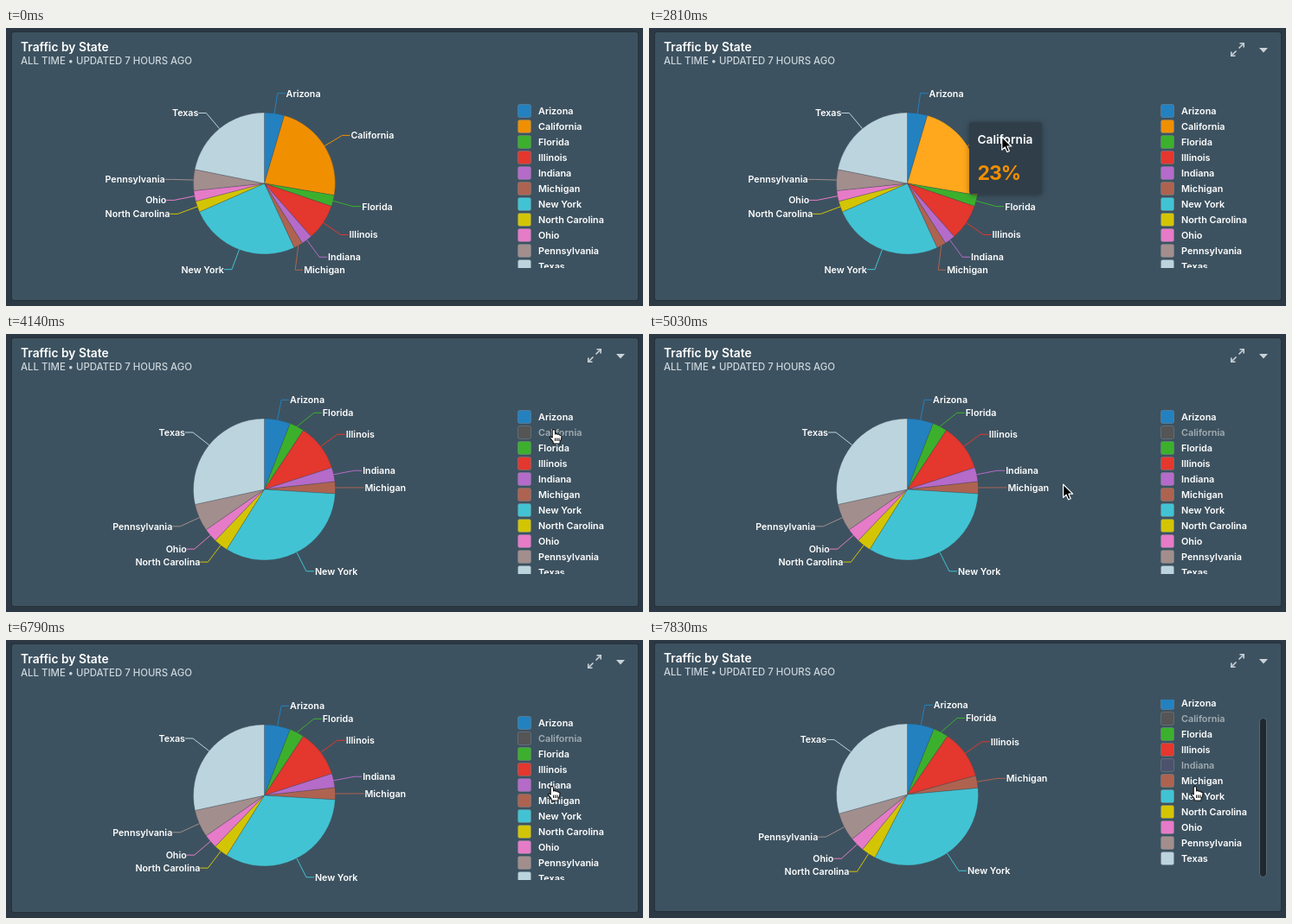
Animation of 736x322 px, one loop 8 s. Source, as an HTML page with a canvas:

```html
<!DOCTYPE html>
<html lang="en">
<head>
<meta charset="utf-8">
<title>Traffic by State</title>
<style>
html, body { margin: 0; width: 100%; height: 100%; overflow: hidden; background: #2c3843; }
canvas { display: block; width: 736px; height: 322px; }
</style>
</head>
<body>
<canvas id="stage"></canvas>
<script>
const W = 736, H = 322, LOOP = 8000;
const START = 1180, STEP = 147.5;
const CX = 298.5, CY = 180, R = 82, LABEL_R = 106, GAP = 15;
const FONT = 'Inter, "Open Sans", sans-serif';
const PANEL = '#3d5260';

// name, degrees of the full pie, colour
const states = [
  ['Arizona', 16.4, '#2381c0'],
  ['California', 83.3, '#f08f00'],
  ['Florida', 9.2, '#3cb02d'],
  ['Illinois', 29.8, '#e4372e'],
  ['Indiana', 8.9, '#b56bc9'],
  ['Michigan', 7.6, '#ae6350'],
  ['New York', 91.1, '#42c3d3'],
  ['North Carolina', 9, '#d3c504'],
  ['Ohio', 8.8, '#e67bc8'],
  ['Pennsylvania', 17.3, '#a28e8d'],
  ['Texas', 78.6, '#bcd4de']
].map(([name, size, color]) => ({ name, size, color }));

// Toggled items: step of the click and swatch colour when off
const toggles = {
  California: { at: 19, off: '#555555' },
  Indiana: { at: 40, off: '#4c526c' }
};

// Hovered slices: first step, end step, tooltip corner
const hovers = [
  { name: 'California', from: 7, to: 13, color: '#ffa81d', x: 370, y: 109, value: '23%' },
  { name: 'New York', from: 29, to: 35, color: '#63d5e0', x: 338, y: 170, value: '33%' }
];

// Pointer path: step, x, y
const path = [
  [0, 690, 60], [5, 380, 139], [7, 357, 150], [8, 358, 151], [10, 358, 151],
  [14, 557, 51], [17, 633, 111], [22, 633, 111], [27, 440, 190], [30, 326, 206],
  [31, 385, 266], [33, 529, 257], [34, 529, 257], [38, 631, 170]
];

const canvas = document.getElementById('stage');
const ctx = canvas.getContext('2d');
const dpr = window.devicePixelRatio || 1;
canvas.width = W * dpr;
canvas.height = H * dpr;

function text(str, x, y, size, weight, color, align = 'left') {
  ctx.font = `${weight} ${size}px ${FONT}`;
  ctx.textAlign = align;
  ctx.fillStyle = color;
  ctx.fillText(str, x, y);
}

function line(points, close) {
  ctx.beginPath();
  points.forEach(([x, y]) => ctx.lineTo(x, y));
  if (close) ctx.closePath();
}

function box(x, y, w, h, r) {
  ctx.beginPath();
  ctx.roundRect(x, y, w, h, r);
}

function hiddenAmount(name, k) {
  const t = toggles[name];
  return t ? Math.min(1, Math.max(0, (k - t.at + 1) / 2)) : 0;
}

function pointerAt(k) {
  let i = 0;
  while (i < path.length - 1 && path[i + 1][0] <= k) i++;
  const a = path[i], b = path[i + 1] || a;
  const p = b === a ? 0 : (k - a[0]) / (b[0] - a[0]);
  return [a[1] + (b[1] - a[1]) * p, a[2] + (b[2] - a[2]) * p];
}

function drawPanel() {
  ctx.fillStyle = '#25313b';
  box(6, 4, 725, 312, 2);
  ctx.fill();
  ctx.fillStyle = PANEL;
  box(7, 5, 723, 310, 2);
  ctx.fill();
  text('Traffic by State', 17, 27, 13.8, 600, '#ffffff');
  text('ALL TIME • UPDATED 7 HOURS AGO', 17, 42, 11.4, 500, '#cbd5db');
}

function drawIcons() {
  ctx.strokeStyle = ctx.fillStyle = '#c9d3d9';
  ctx.lineWidth = 1.6;
  for (const s of [1, -1]) {
    ctx.save();
    ctx.translate(680, 25);
    ctx.scale(s, s);
    line([[1.5, -1.5], [6.5, -6.5]]);
    ctx.stroke();
    line([[2.5, -7.2], [7.2, -7.2], [7.2, -2.5]]);
    ctx.stroke();
    ctx.restore();
  }
  line([[705, 23], [715, 23], [710, 28.5]], true);
  ctx.fill();
}

function drawPie(k, hover) {
  const parts = states.map(s => ({ ...s, hidden: hiddenAmount(s.name, k) }));
  parts.forEach(s => s.size *= 1 - s.hidden);
  const total = parts.reduce((sum, s) => sum + s.size, 0);
  let angle = 0, lastRight = -Infinity, lastLeft = Infinity;

  for (const s of parts) {
    if (!s.size) continue;
    const sweep = s.size / total * Math.PI * 2;
    const mid = angle + sweep / 2;
    ctx.beginPath();
    ctx.moveTo(CX, CY);
    ctx.arc(CX, CY, R, angle - Math.PI / 2, angle + sweep - Math.PI / 2);
    ctx.closePath();
    ctx.fillStyle = hover && hover.name === s.name ? hover.color : s.color;
    ctx.fill();
    ctx.strokeStyle = 'rgba(55,65,75,.5)';
    ctx.lineWidth = 0.6;
    ctx.stroke();
    angle += sweep;
    if (s.hidden) continue;

    // Keep labels apart, then set x from the label circle
    const side = mid < Math.PI ? 1 : -1;
    let dy = -Math.cos(mid) * LABEL_R;
    if (side > 0) lastRight = dy = Math.max(dy, lastRight + GAP);
    else lastLeft = dy = Math.min(dy, lastLeft - GAP);
    const dx = Math.sqrt(Math.max(0, LABEL_R ** 2 - dy * dy));
    const x = CX + side * dx, y = CY + 0.5 + dy;
    line([[CX + Math.sin(mid) * R, CY - Math.cos(mid) * R], [x, y], [x + side * 9, y]]);
    ctx.strokeStyle = s.color;
    ctx.lineWidth = 1;
    ctx.stroke();
    text(s.name, x + side * 9.5 + 0.5, y + 4, 10.7, 600, '#ffffff', side > 0 ? 'left' : 'right');
  }
}

function drawLegend(k) {
  const scroll = k < 44 ? 0 : k < 45 ? 11 : 22;
  ctx.save();
  ctx.beginPath();
  ctx.rect(585, 70, 115, 208);
  ctx.clip();
  states.forEach((s, i) => {
    const y = 96 + i * 18 - scroll;
    const off = hiddenAmount(s.name, k) > 0;
    box(591.5, y - 7.5, 15, 15, 2);
    ctx.fillStyle = off ? toggles[s.name].off : s.color;
    ctx.fill();
    ctx.strokeStyle = 'rgba(122,135,144,.5)';
    ctx.lineWidth = 1;
    ctx.stroke();
    text(s.name, 615, y + 4, 10.85, 600, off ? '#a3adb3' : '#ffffff');
  });
  ctx.restore();
  if (scroll) {
    box(705.5, 91.5, 8, 184, 4);
    ctx.fillStyle = '#1f282f';
    ctx.fill();
    ctx.strokeStyle = '#566873';
    ctx.lineWidth = 1;
    ctx.stroke();
  }
}

function drawTooltip(h) {
  ctx.save();
  ctx.shadowColor = 'rgba(0,0,0,.35)';
  ctx.shadowBlur = 7 * dpr;
  ctx.shadowOffsetY = dpr;
  ctx.fillStyle = '#303e49';
  box(h.x, h.y, 84, 83.5, 3);
  ctx.fill();
  ctx.restore();
  const color = states.find(s => s.name === h.name).color;
  text(h.name, h.x + 9.5, h.y + 25, 13.7, 600, '#ffffff');
  ctx.save();
  ctx.letterSpacing = '-1px';
  text(h.value, h.x + 9.5, h.y + 67, 23, 700, color);
  ctx.restore();
}

function drawArrow() {
  line([[0, 0], [0, 15.2], [3.5, 12], [6, 17.6], [8.6, 16.5], [6.2, 11], [11, 11]], true);
  ctx.fillStyle = '#000000';
  ctx.strokeStyle = '#ffffff';
  ctx.lineWidth = 1.2;
  ctx.lineJoin = 'round';
  ctx.fill();
  ctx.stroke();
}

function drawHand() {
  ctx.beginPath();
  ctx.moveTo(-1.8, 9);
  ctx.lineTo(-1.8, 1);
  ctx.quadraticCurveTo(-1.6, -0.6, 0, -0.6);
  ctx.quadraticCurveTo(1.2, -0.4, 1.4, 1);
  ctx.lineTo(1.6, 5);
  ctx.quadraticCurveTo(3.2, 3.6, 4.4, 5.4);
  ctx.quadraticCurveTo(6, 4.4, 7, 6.2);
  ctx.quadraticCurveTo(9, 5.8, 9, 8);
  ctx.quadraticCurveTo(9, 11, 7.2, 13.2);
  ctx.lineTo(7, 16);
  ctx.lineTo(-0.6, 16);
  ctx.lineTo(-1, 13.6);
  ctx.lineTo(-4.6, 9.2);
  ctx.quadraticCurveTo(-4.6, 7, -1.8, 9);
  ctx.closePath();
  ctx.fillStyle = '#ffffff';
  ctx.strokeStyle = '#111111';
  ctx.lineWidth = 1.1;
  ctx.lineJoin = 'round';
  ctx.fill();
  ctx.stroke();
  for (const x of [1.6, 3.8, 6]) {
    line([[x, 9.6], [x, 13]]);
    ctx.stroke();
  }
}

function drawPointer(k) {
  const [x, y] = pointerAt(k);
  const overLegend = x >= 591 && x < 692 && y > 87 && y < 278;
  ctx.save();
  ctx.translate(x, y);
  if (overLegend) drawHand();
  else drawArrow();
  ctx.restore();
}

function draw(time) {
  const k = Math.floor((time - START) / STEP);
  const hover = hovers.find(h => k >= h.from && k < h.to);
  ctx.setTransform(dpr, 0, 0, dpr, 0, 0);
  ctx.fillStyle = '#2c3843';
  ctx.fillRect(0, 0, W, H);
  ctx.save();
  if (k >= 44) ctx.translate(0, -1);
  drawPanel();
  if (k >= 0) drawIcons();
  drawPie(k, hover);
  drawLegend(k);
  if (hover) drawTooltip(hover);
  ctx.restore();
  if (k >= 0) drawPointer(k);
}

const begin = performance.now();
function tick() {
  draw((performance.now() - begin) % LOOP);
  requestAnimationFrame(tick);
}
tick();
</script>
</body>
</html>
```
